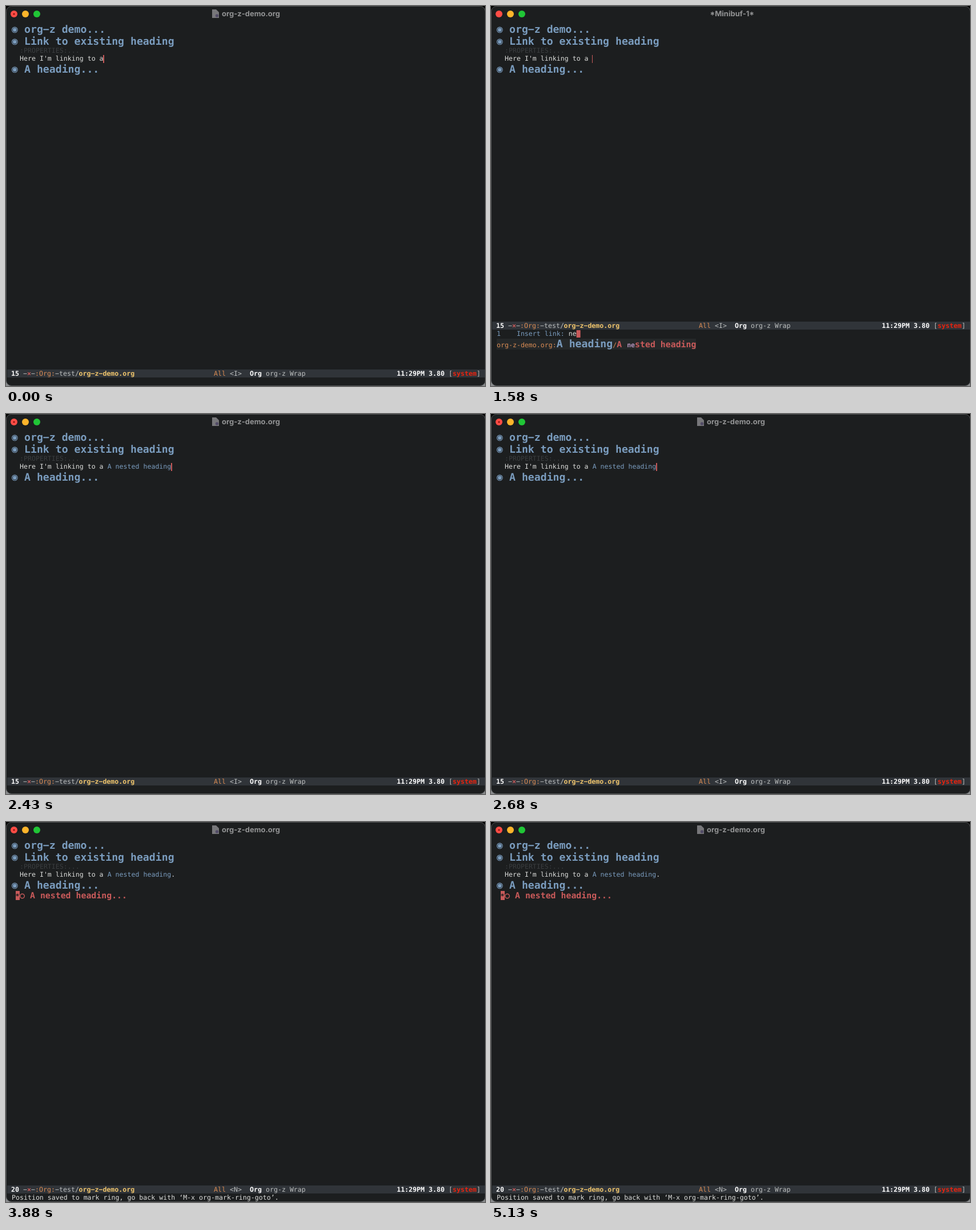
An HTML page with a canvas that plays this animation: 839 by 667 pixels, repeating every 5.18 s.

```html
<!DOCTYPE html>
<html lang="en">
<head>
<meta charset="utf-8">
<title>org-z demo</title>
<style>
  html, body { margin: 0; width: 100%; height: 100%; overflow: hidden; background: #000; }
  canvas { display: block; }
</style>
</head>
<body>
<canvas id="stage" width="839" height="667"></canvas>
<script>
const ctx = document.getElementById('stage').getContext('2d');
const LOOP = 5180;
const BODY = 11.6, HEAD = 18.18, SUB = 14.87;
const ADVANCE = 0.602;          // glyph width per font size
const CELL = BODY * ADVANCE;
const C = {
  bg: '#1c1e1f', bar: '#303439', edge: '#505253', text: '#dcdddb', dim: '#bcbfbf',
  blue: '#7a9cbe', red: '#c85a5a', orange: '#d88b54', yellow: '#f0c56c',
  purple: '#b294bb', faint: '#3b3e40', white: '#fff', alert: '#e9230f', title: '#929394'
};

// Moments at which the session changes, in ms
const T = { space: 380, open: 1280, n: 1380, ne: 1480, insert: 2230, linked: 2280,
            dot: 3130, normal: 3530, jump: 3880 };

function rect(x, y, w, h, color) {
  ctx.fillStyle = color;
  ctx.fillRect(x, y, w, h);
}

function disc(x, y, r, color) {
  ctx.fillStyle = color;
  ctx.beginPath();
  ctx.arc(x, y, r, 0, 7);
  ctx.fill();
}

function ring(x, y, r, color, width) {
  ctx.strokeStyle = color;
  ctx.lineWidth = width;
  ctx.beginPath();
  ctx.arc(x, y, r, 0, 7);
  ctx.stroke();
}

// Draws monospaced text and returns the x where it ends
function mono(s, x, y, color, size = BODY, bold = false) {
  ctx.font = `${bold ? 'bold ' : ''}${size}px "DejaVu Sans Mono", monospace`;
  ctx.fillStyle = color;
  ctx.fillText(bold ? s.replace(/-/g, '−') : s, x, y);
  return x + s.length * size * ADVANCE;
}

function heading(s, y) {
  ring(15.3, y - 5.1, 4.8, C.blue, 1.1);
  disc(15.3, y - 5.1, 3.3, C.blue);
  mono(s, 32, y, C.blue, HEAD, true);
}

function titleBar(mini) {
  ['#ff4c45', '#fdb42b', '#20c636'].forEach((c, i) => disc(14 + 20 * i, 14, 6, c));
  ctx.font = 'bold 13px Inter, sans-serif';
  ctx.textAlign = 'center';
  ctx.fillStyle = C.title;
  ctx.fillText(mini ? '*Minibuf-1*' : 'org-z-demo.org', mini ? 422.3 : 429, 18);
  ctx.textAlign = 'left';
  if (mini) return;
  disc(14, 14, 1.6, '#85130f');
  ctx.fillStyle = '#77777a';
  ctx.beginPath();
  [[361, 6], [368, 6], [373, 11], [373, 21], [361, 21]].forEach(p => ctx.lineTo(...p));
  ctx.fill();
  disc(369.5, 17, 2.7, '#514b66');
}

function modeLine(y, line, mode) {
  rect(2, y, 837, 14, C.bar);
  const parts = [
    [9, line, C.white, 1], [30, '−', C.dim], [37, '×', C.red, 1], [44, '−', C.dim],
    [51, ':Org:', C.orange], [86, '−test/', C.dim], [127.5, 'org-z-demo.org', C.yellow, 1],
    [364, 'All', C.orange], [392, `<${mode}>`, C.dim], [427, 'Org', C.white, 1],
    [455, 'org-z Wrap', C.dim], [684.4, '11:29PM 3.80', C.white, 1],
    [775.3, '[', C.dim], [782.3, 'system', C.alert, 1], [824.2, ']', C.dim]
  ];
  for (const [x, s, color, bold] of parts) mono(s, x, y + 11, color, BODY, !!bold);
}

function minibuffer(typed) {
  let x = mono('1    Insert link: ', 10, 579, C.blue);
  x = mono(typed, x, 579, C.text);
  rect(x, 569, CELL, 13, C.red);

  rect(10, 584, 349, 19, '#252829');
  x = mono('org-z-demo.org:', 10, 599, C.orange);
  x = mono('A heading', x, 599, C.blue, HEAD, true);
  x = mono('/', x, 599, C.orange);
  x = mono('A ', x, 599, C.red, SUB, true);
  x = mono(typed, x, 599, C.purple, BODY, true);
  mono('nested heading'.slice(typed.length), x, 599, C.red, SUB, true);
}

function bodyLine(t, mini) {
  let x = mono("Here I'm linking to a", 24, 96, C.text);
  if (t >= T.space) x += CELL;
  if (t >= T.linked) x = mono('A nested heading', x, 96, C.blue);
  const normal = t >= T.normal && t < T.jump;
  if (normal) rect(x, 86, CELL, 13, C.red);
  if (t >= T.dot) x = mono('.', x, 96, normal ? C.bg : C.text);
  if (t >= T.normal || (t >= T.insert && t < T.linked)) return;
  rect(Math.round(x - 0.4), 86, mini ? 1 : 2, 14, C.red);
}

function draw(t) {
  const mini = t >= T.open && t < T.insert;
  const inserting = t >= T.insert && t < T.linked;
  const jumped = t >= T.jump;

  // Desktop behind the rounded window: dark above, light below
  rect(0, 0, 839, 333, '#000');
  rect(0, 333, 839, 334, '#8a8c8e');
  ctx.beginPath();
  ctx.roundRect(0.5, 0.5, 839, 666, 9);
  ctx.fillStyle = C.bg;
  ctx.fill();
  ctx.strokeStyle = C.edge;
  ctx.lineWidth = 1;
  ctx.stroke();

  titleBar(mini);
  heading('org-z demo...', 47);
  heading('Link to existing heading', 68);
  mono(':PROPERTIES:...', 24, 82, C.faint);
  bodyLine(t, mini);
  heading('A heading...', 117);

  if (inserting) {
    rect(130, 100, 1, 21, C.red);
    return;
  }
  modeLine(mini ? 554 : 638, jumped ? '20' : '15', t >= T.normal ? 'N' : 'I');
  if (mini) minibuffer(t >= T.ne ? 'ne' : t >= T.n ? 'n' : '');
  if (jumped) {
    rect(17, 121, 7, 16, C.red);
    mono('*', 16.5, 134, C.bg, BODY, true);
    ring(28.5, 130, 3.8, C.red, 1.4);
    mono('A nested heading...', 42, 134, C.red, SUB, true);
    mono('Position saved to mark ring, go back with ‘M-x org-mark-ring-goto’.', 10, 663, C.text);
  }
}

ctx.textRendering = 'geometricPrecision';
const start = performance.now();
function tick() {
  draw((performance.now() - start) % LOOP);
  requestAnimationFrame(tick);
}
tick();
</script>
</body>
</html>
```
